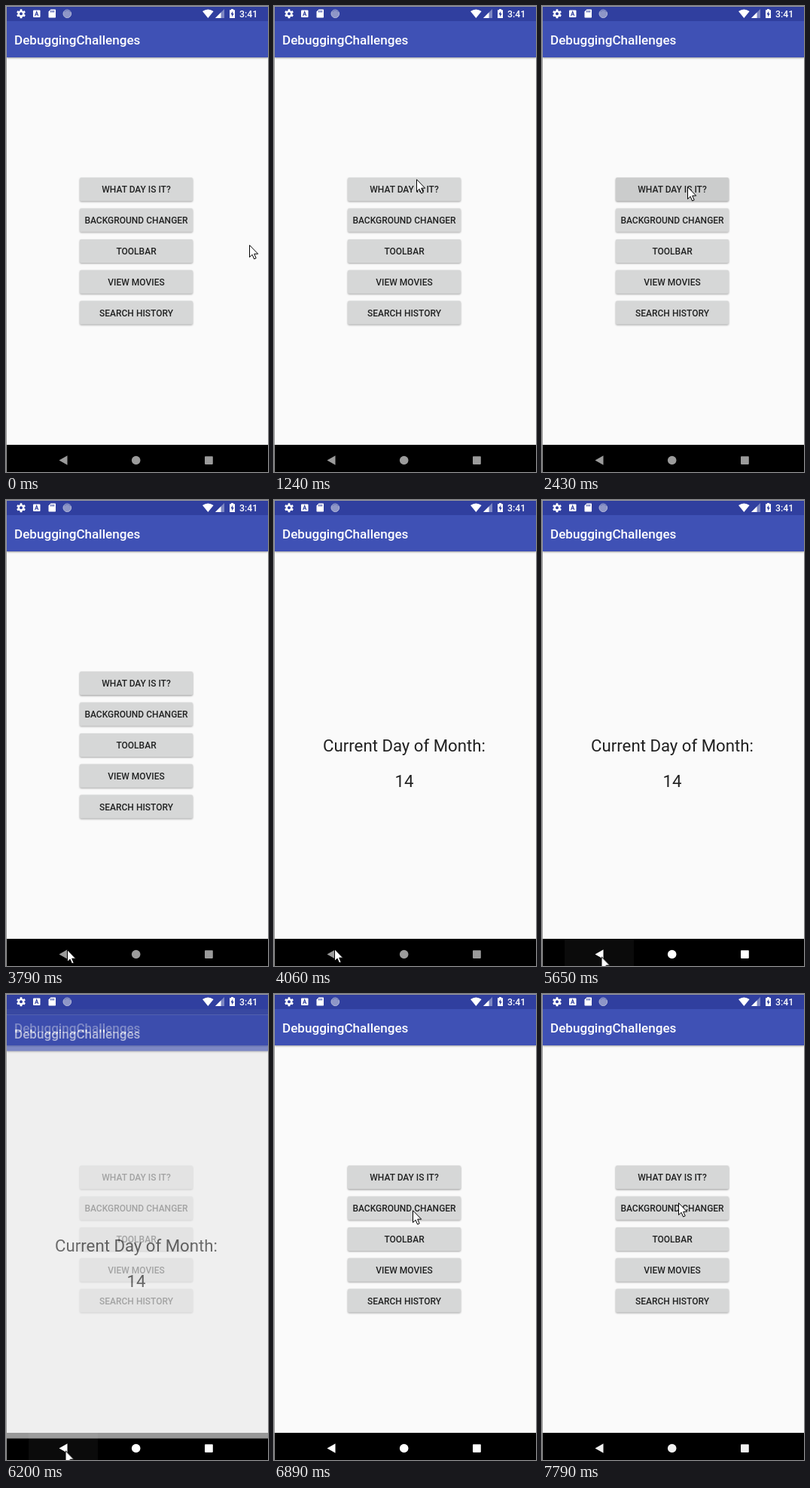
An HTML page for the animation above (8000 ms loop, 348 by 617 pixels).

```html
<!DOCTYPE html>
<html lang="en">
<head>
<meta charset="utf-8">
<title>DebuggingChallenges</title>
<style>
html, body { margin: 0; width: 100%; height: 100%; overflow: hidden; background: #000; }
svg { display: block; width: 348px; height: 617px; font-family: Roboto, sans-serif; }
.title { font-size: 17.1px; font-weight: 500; fill: #fff; }
.label { font-size: 12px; font-weight: 500; fill: #212222; text-anchor: middle; }
.info { font-size: 22.2px; fill: #212121; text-anchor: middle; }
.clock { font-size: 12.3px; font-weight: 500; fill: #fff; }
.button { fill: #d6d7d7; filter: drop-shadow(0 1px .8px rgba(0,0,0,.34)); }
.bar { fill: #3f51b5; filter: drop-shadow(0 1px 1.3px rgba(0,0,0,.38)); }

/* Everything holds its state between changes, like a screen recording. */
.play { animation: 8s step-end infinite; }
#cursor { animation-name: move; }
#first { animation-name: pressFirst; }
#second { animation-name: pressSecond; }
#day { animation-name: day; }
#dim { animation-name: dim; }
#keys { animation-name: keys; }
#touch { animation-name: touch; }

@keyframes move {
  0% { transform: translate(323px, 316px); }
  5.375% { transform: translate(185px, 66px); }
  7.25% { transform: translate(250px, 72px); }
  8.75% { transform: translate(270px, 112px); }
  10.25% { transform: translate(190px, 123px); }
  12.125% { transform: translate(181px, 188px); }
  14% { transform: translate(184px, 212px); }
  15.5% { transform: translate(189px, 229px); }
  17% { transform: translate(192px, 237px); }
  18.5% { transform: translate(193px, 239px); }
  37.625% { transform: translate(182px, 290px); }
  39.125% { transform: translate(128px, 470px); }
  40.625% { transform: translate(86px, 578px); }
  42.5% { transform: translate(86px, 590px); }
  44% { transform: translate(85px, 598px); }
  45.875% { transform: translate(83px, 597px); }
  47.375% { transform: translate(81px, 595px); }
  49.25%, 50.75% { transform: translate(80px, 594px); }
  55.75% { transform: translate(79px, 598px); }
  57.25% { transform: translate(78px, 602px); }
  58.75% { transform: translate(78.5px, 604px); }
  80.875% { transform: translate(135px, 440px); }
  82.375% { transform: translate(185px, 306px); }
  84.25% { transform: translate(185px, 293px); }
  86.125% { transform: translate(184px, 286px); }
  87.625% { transform: translate(182px, 279px); }
  89.125%, 100% { transform: translate(181px, 276px); }
}
@keyframes pressFirst {
  0% { fill: #d6d7d7; }
  25.5% { fill: #d3d4d4; filter: drop-shadow(0 1.5px 1.2px rgba(0,0,0,.4)); }
  27.375% { fill: #cecfcf; filter: drop-shadow(0 1.5px 1.2px rgba(0,0,0,.4)); }
  30.375% { fill: #cbcccc; filter: drop-shadow(0 1.5px 1.2px rgba(0,0,0,.4)); }
  45.875%, 100% { fill: #d6d7d7; }
}
@keyframes pressSecond {
  0% { filter: drop-shadow(0 1px .8px rgba(0,0,0,.34)); }
  92.5%, 100% { filter: drop-shadow(0 1.2px 1px rgba(0,0,0,.38)); }
}
@keyframes day {
  0% { opacity: 0; transform: none; }
  49.25% { opacity: .7; transform: translateY(8px); }
  50.75% { opacity: 1; transform: none; }
  77.5% { opacity: .61; transform: translateY(7.5px); }
  79.375% { opacity: .2; transform: translateY(20px); }
  80.875%, 100% { opacity: 0; transform: none; }
}
@keyframes dim {
  0% { opacity: 0; }
  49.25% { opacity: .06; }
  50.75% { opacity: 0; }
  77.5% { opacity: .11; }
  79.375% { opacity: .04; }
  80.875%, 100% { opacity: 0; }
}
@keyframes keys {
  0% { fill: #9b9b9b; }
  65.75% { fill: #e0e0e0; }
  67.25% { fill: #fff; }
  97.375%, 100% { fill: #f1f1f1; }
}
@keyframes touch {
  0% { opacity: 0; }
  65.75% { opacity: .5; }
  67.25% { opacity: .8; }
  70.625% { opacity: 1; }
  79.375% { opacity: .5; }
  80.875%, 100% { opacity: 0; }
}
</style>
</head>
<body>
<svg viewBox="0 0 348 617">
  <defs>
    <rect id="box" x="98" y="227.3" width="150" height="31" rx="1.7"/>
    <g id="header">
      <rect x="1" y="20" width="347" height="561" fill="#fafafa"/>
      <rect class="bar" x="1" y="20" width="347" height="48"/>
      <text class="title" x="11" y="51">DebuggingChallenges</text>
    </g>
    <rect id="tooth" x="-1.4" y="-6" width="2.8" height="12" rx=".5"/>
  </defs>

  <g id="menu">
    <use href="#header"/>
    <use href="#box" id="first" class="button play"/>
    <use href="#box" id="second" class="button play" y="40.8"/>
    <use href="#box" class="button" y="81.6"/>
    <use href="#box" class="button" y="122.4"/>
    <use href="#box" class="button" y="163.2"/>
    <g class="label">
      <text x="173" y="247.4">WHAT DAY IS IT?</text>
      <text x="173" y="288.2">BACKGROUND CHANGER</text>
      <text x="173" y="329">TOOLBAR</text>
      <text x="173" y="369.8">VIEW MOVIES</text>
      <text x="173" y="410.6">SEARCH HISTORY</text>
    </g>
  </g>
  <rect id="dim" class="play" x="1" y="20" width="347" height="561"/>

  <g id="navigation">
    <rect x="1" y="581" width="347" height="36"/>
    <rect id="touch" class="play" x="30" y="581" width="92" height="36" fill="#0b0b0b"/>
    <g id="keys" class="play">
      <path d="M70.5 601.5L81.5 595.3V607.7Z"/>
      <circle cx="172.7" cy="601.5" r="5.8"/>
      <rect x="264" y="596.3" width="10.8" height="10.6" rx=".8"/>
    </g>
  </g>

  <g id="day" class="play">
    <use href="#header"/>
    <g class="info">
      <text x="173" y="333.3">Current Day of Month:</text>
      <text x="173" y="380">14</text>
    </g>
  </g>

  <g id="status" fill="#fff">
    <rect x="1" y="1" width="347" height="19" fill="#303f9f"/>
    <g transform="translate(20 10.3)">
      <use href="#tooth"/>
      <use href="#tooth" transform="rotate(60)"/>
      <use href="#tooth" transform="rotate(120)"/>
      <circle r="4.4"/>
      <circle r="2" fill="#303f9f"/>
    </g>
    <rect x="36" y="5.5" width="9.5" height="9.5" rx="1"/>
    <path d="M38.6 13L40.7 7.6L42.8 13M39.4 11.3H42" fill="none" stroke="#303f9f" stroke-width="1.1"/>
    <path d="M59.5 4.5H65.3Q66 4.5 66 5.2V14.8Q66 15.5 65.3 15.5H57.2Q56.5 15.5 56.5 14.8V7.5Z"/>
    <path d="M59.7 6V8.5M61.6 6V8.5M63.5 6V8.5" stroke="#303f9f"/>
    <circle cx="81.3" cy="10.3" r="5.3" fill="#8e96c7" stroke="#b4badb"/>
    <path d="M77.5 7.5A5 5 0 0 1 85.6 8" fill="none" stroke="#737eba" stroke-width="1.4"/>
    <path d="M268.3 16L261 7.1Q268.3 1.8 275.6 7.1Z"/>
    <path d="M278 16L290 4V16Z" fill="#7d87c2"/>
    <path d="M278 16L285.5 8.5V16Z"/>
    <path d="M299 4H302V5.2H304V16H297V5.2H299Z"/>
    <path d="M301.2 6.8L298.4 11.2H300.1V14.5L302.7 10H301.2Z" fill="#303f9f"/>
    <text class="clock" x="310" y="14.8">3:41</text>
  </g>

  <path d="M0 .5H348M.5 0V617" stroke="#9a9a9a"/>
  <path id="cursor" class="play" d="M.5 .7V16.6L4.1 13.2L6.6 19L9.2 17.9L6.7 12.2H11.7Z"
        fill="#fff" stroke="#000" stroke-width="1" stroke-linejoin="round"/>
</svg>
</body>
</html>
```
